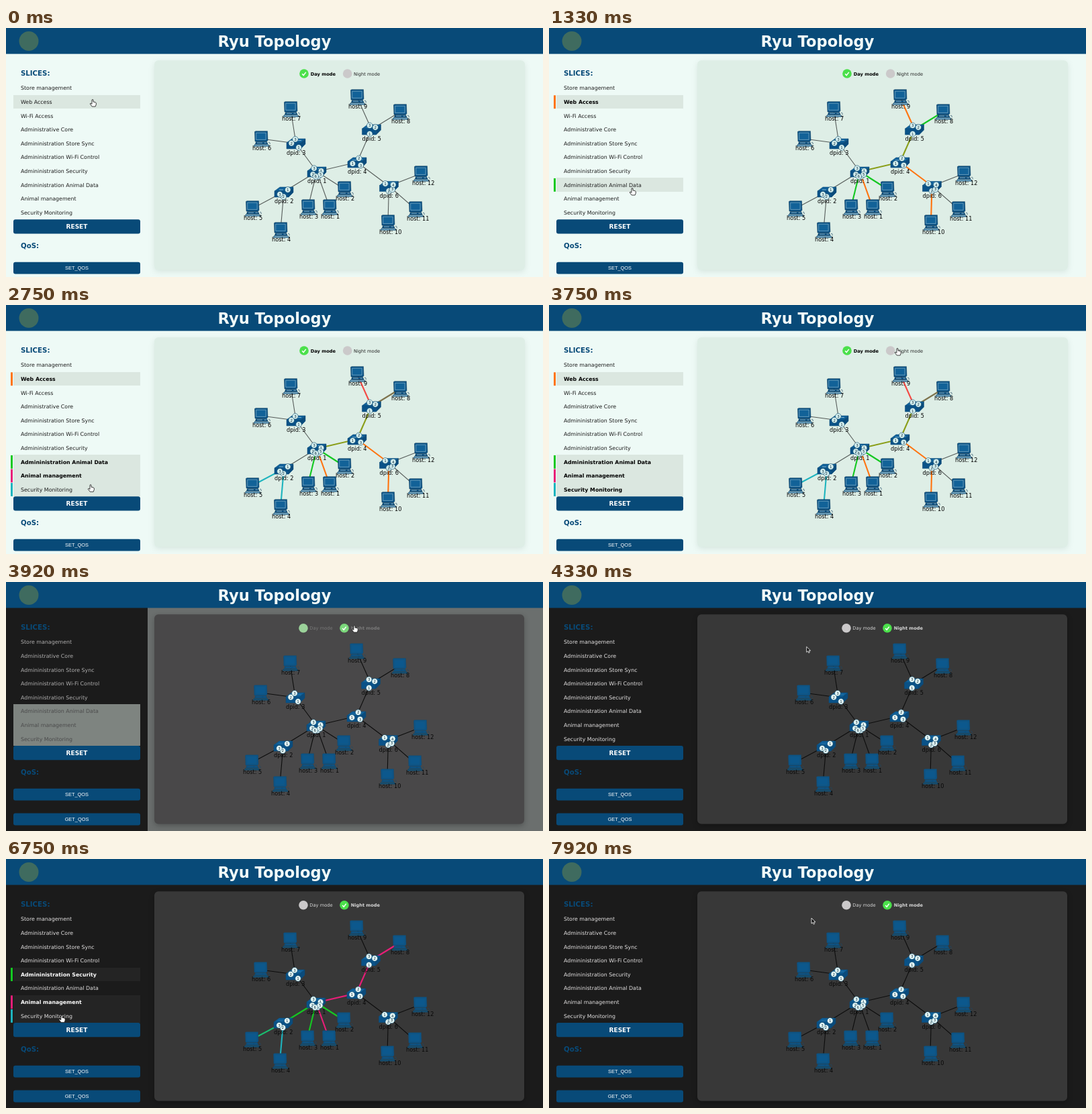
Write an HTML page that moves like this. It is 800 px wide and 371 px high and loops after 8000 ms.

```html
<!DOCTYPE html>
<html lang="en">
<head>
<meta charset="utf-8">
<title>Ryu Topology</title>
<style>
html, body { margin: 0; width: 100%; height: 100%; overflow: hidden; background: #eefaf6; }
svg { display: block; width: 800px; height: 371px; }
text { font-family: "DejaVu Sans", Verdana, sans-serif; white-space: pre; }
.b { font-weight: bold; }
.btn { font-family: "Liberation Sans", Arial, sans-serif; }
.mid { text-anchor: middle; }
</style>
</head>
<body>
<svg id="stage" viewBox="0 0 800 371"></svg>
<script>
const LOOP = 8000, STEP = 1000 / 12, NIGHT_AT = 3830, RESET_AT = 7560, DWELL = 170;
const BLUE = '#084a78';
const ROW_TOP = 79.2, ROW_H = 20.6;
const COLORS = { orange: [255, 116, 16], green: [20, 200, 34], pink: [232, 30, 120], cyan: [30, 180, 190] };

const nodes = {
  1: [463, 214], 2: [414, 244], 3: [432, 172], 4: [523, 200], 5: [544.5, 151], 6: [570.5, 235.5],
  h1: [482, 267], h2: [504, 240], h3: [450, 267], h4: [409, 301], h5: [367, 269], h6: [380, 165],
  h7: [424, 121], h8: [587, 125], h9: [523, 103], h10: [569, 290], h11: [610, 270], h12: [618, 217]
};

// For each switch: neighbours listed by port number
const ports = {
  1: '4 2 3 h1 h2 h3', 2: '1 h4 h5', 3: '1 h6 h7', 4: '1 5 6', 5: '4 h8 h9', 6: '4 h10 h11 h12'
};

const links = [];
for (const s in ports) for (const n of ports[s].split(' ')) {
  if (n[0] === 'h' || +n > +s) links.push(s + '-' + n);
}

const slices = {
  'Store management': {},
  'Web Access': { color: 'orange', day: '1-h1 1-4 4-5 5-h9 4-6 6-h10' },
  'Wi-Fi Access': {},
  'Administrative Core': {},
  'Admininistration Store Sync': {},
  'Admininistration Wi-Fi Control': {},
  'Admininistration Security': { color: 'green', night: '1-2 2-h5 1-h2 1-h3' },
  'Admininistration Animal Data': { color: 'green', day: '1-h2 1-h3 1-4 4-5 5-h8' },
  'Animal management': { color: 'pink', day: '5-h8 5-h9', night: '1-h1 1-4 4-5 5-h8' },
  'Security Monitoring': { color: 'cyan', day: '2-h4 2-h5', night: '2-h4 2-h5' }
};
const dayList = Object.keys(slices);
const nightList = dayList.filter(name => !/^W/.test(name));

// time, slice chosen
const clicks = [
  [420, 'Web Access'], [1650, 'Admininistration Animal Data'], [2250, 'Animal management'],
  [3000, 'Security Monitoring'], [4980, 'Admininistration Security'],
  [6000, 'Animal management'], [6850, 'Security Monitoring']
];

// time, x, y of the pointer tip
const pointer = [
  [-100, 150, 60], [0, 129, 107], [750, 129, 108], [1150, 124, 236], [1330, 124, 239], [1750, 124, 239],
  [2000, 125, 252], [2350, 125, 252], [2560, 126, 268], [3150, 126, 269], [3600, 515, 66],
  [3750, 519, 65], [4150, 519, 65], [4650, 75, 168], [5050, 72, 170], [5280, 70, 206],
  [6150, 70, 208], [6400, 80, 232], [6950, 84, 234], [7250, 100, 254], [7600, 101, 254], [7900, 391, 88]
];

const clamp = v => Math.max(0, Math.min(1, v));
const rgb = c => `rgb(${c.map(Math.round)})`;
const blend = (a, b, k) => rgb(a.map((v, i) => v + (b[i] - v) * k));
const rect = (x, y, w, h, fill, extra = '') =>
  `<rect x="${x}" y="${y}" width="${w}" height="${h}" fill="${fill}" ${extra}/>`;
const text = (x, y, size, fill, str, cls = '') =>
  `<text x="${x}" y="${y}" font-size="${size}" fill="${fill}" class="${cls}">${str}</text>`;
const path = (d, fill, stroke = 'none', width = 0.5) =>
  `<path d="${d}" fill="${fill}" stroke="${stroke}" stroke-width="${width}"/>`;
const line = (a, b, color, width) =>
  `<path d="M${a}L${b}" stroke="${color}" stroke-width="${width}"/>`;

function pointerAt(t) {
  const i = pointer.findIndex(p => p[0] > t);
  if (i === 0) return pointer[0].slice(1);
  if (i < 0) return pointer[pointer.length - 1].slice(1);
  const [t0, x0, y0] = pointer[i - 1], [t1, x1, y1] = pointer[i];
  const u = (t - t0) / (t1 - t0), k = u * u * (3 - 2 * u);
  return [x0 + (x1 - x0) * k, y0 + (y1 - y0) * k];
}

function rowAt(t, list) {
  const [x, y] = pointerAt(t);
  return x > 11 && x < 200 ? list[Math.floor((y - ROW_TOP) / ROW_H)] : undefined;
}

function button(y, h, label, bold) {
  return rect(11, y, 189, h, BLUE, 'rx="3"') + (bold
    ? text(105.5, y + 14, 9, '#fff', label, 'b mid')
    : text(105.5, y + 11.5, 7.4, '#fff', label, 'btn mid'));
}

function sidebar({ night, k, list, chosen, hover, active }) {
  const row = (i, fill) => rect(11, ROW_TOP + i * ROW_H, 189, ROW_H, fill, 'shape-rendering="crispEdges"');
  let out = text(22, 71.2, 10.2, BLUE, 'SLICES:', 'b');
  list.forEach((name, i) => {
    const top = ROW_TOP + i * ROW_H;
    const picked = chosen.includes(name), color = slices[name].color;
    const leaving = night && k < 1 && i > 4;
    if (leaving) out += row(i, blend([219, 231, 224], [27, 27, 27], k * .78));
    else if (picked || name === hover) out += row(i, night ? '#242424' : '#dbe7e0');
    if (active.includes(name) && color) out += rect(7, top + .5, 3, ROW_H - .7, rgb(COLORS[color]));
    const ink = leaving ? blend([40, 40, 40], [225, 225, 225], k * .3)
      : night ? blend([90, 90, 90], [228, 226, 226], k) : '#1c1c1c';
    out += picked ? text(22, top + 13.1, 7.8, night ? '#fff' : '#000', name, 'b')
      : text(22, top + 13.1, 7.88, ink, name);
  });
  out += button(ROW_TOP + list.length * ROW_H, 21.3, 'RESET', true);
  out += text(22, night ? 286.8 : 328, 10.2, BLUE, 'QoS:', 'b');
  out += button(night ? 307.8 : 348.8, 17.8, 'SET_QOS');
  if (night) out += button(344.6, 17.8, 'GET_QOS');
  return out;
}

function toggle(x, y, on, fill) {
  return `<circle cx="${x}" cy="${y}" r="6.8" fill="${fill}"/>` +
    (on ? path(`M${x - 2.8} ${y + .2}l2 2.3 3.6-4.6`, 'none', '#fff', 1.5) : '');
}

function modes({ night, k }) {
  const on = [75, 224, 75], off = [203, 201, 202];
  if (!night) return toggle(444, 68, true, rgb(on)) + toggle(508.7, 68, false, rgb(off)) +
    text(453.7, 70.6, 6.7, '#000', 'Day mode', 'b') + text(518, 70.6, 6.7, '#222', 'Night mode');
  const ink = blend([30, 30, 30], [215, 215, 215], k ** 1.5);
  return toggle(443, 68.7, false, blend(on, off, k)) + toggle(504, 68.7, true, blend(off, on, k)) +
    text(452.3, 71.2, 6.7, ink, 'Day mode') + text(513.7, 71.2, 6.6, ink, 'Night mode', 'b');
}

function host([x, y], night) {
  const light = night ? '#1c587f' : '#b9d8e4', dark = night ? '#1b4a6b' : '#0b3553';
  return `<g transform="translate(${x} ${y})">` +
    path('M-9.5-10.5L-8-11.3H9.5L10 2.5 8.5 4H-9z', '#0b5488', dark) +
    path('M-7.3-8.8H7.2V1.4H-7.3z', night ? '#0c588d' : '#126298', light) +
    path('M-7.5 4.4H8.5L10 8H-8.5z', '#0b4f80', dark) +
    path('M-6 6.2H2M4.5 6.2H8', 'none', light, .7) +
    path('M-9.5 8.4H10.5L13 11.2H-11z', night ? '#104868' : '#3b7da5', dark) +
    path('M-9 9.7H11', 'none', light, .6) + path('M11 5.5q3-1 2 3', 'none', dark, .6) + '</g>';
}

function router([x, y], night) {
  return `<g transform="translate(${x} ${y})">` +
    path('M-14-1L-6-7H14L7-1z', '#0f609a', '#0b4a77') +
    path('M-14-1H7V8H-14z', '#0a5288', '#0b4a77') +
    path('M7-1L14-7V1L7 8z', '#0a4b7c', '#0b4a77') +
    path('M-7-3H-1M2-4.5H8', 'none', night ? '#2c75a5' : '#b5d7e6', .7) + '</g>';
}

function topology({ night, active }) {
  const mode = night ? 'night' : 'day';
  let out = '';
  for (const link of links) {
    const [a, b] = link.split('-').map(n => nodes[n]);
    const tints = active.filter(n => (slices[n][mode] || '').split(' ').includes(link))
      .map(n => COLORS[slices[n].color]);
    const mean = [0, 1, 2].map(c => tints.reduce((sum, t) => sum + t[c], 0) / tints.length);
    out += tints.length ? line(a, b, rgb(mean), 2.1)
      : line(a, b, night ? '#0c0c0c' : '#555b59', 1.1);
  }
  const ink = night ? '#080808' : '#000';
  for (const n in nodes) {
    const [x, y] = nodes[n], isHost = n[0] === 'h';
    out += isHost ? host([x, y], night) : router([x, y], night);
    out += isHost ? text(x - 13, y + 17.3, 8.2, ink, 'host: ' + n.slice(1))
      : text(x - 14, y + 17.3, 8.2, ink, 'dpid: ' + n);
  }
  for (const s in ports) ports[s].split(' ').forEach((n, i) => {
    const [x, y] = nodes[s], [tx, ty] = nodes[n];
    const d = 6.8 / Math.hypot(tx - x, ty - y);
    const px = x + (tx - x) * d, py = y + .5 + (ty - y) * d;
    out += `<circle cx="${px}" cy="${py}" r="4.3" fill="${night ? '#e6fafa' : '#d5f0f1'}" stroke="#164e6c" stroke-width=".6"/>` +
      text(px, py + 2, 5.6, '#102a38', i + 1, 'mid');
  });
  return `<g transform="translate(${night ? -1 : 0} 0)">${out}</g>`;
}

function cursor([x, y], hand) {
  const shape = hand
    ? 'M-1 0Q0-1 1 0V3L4 3.6 5.3 4.6V7L4.2 10H-.8L-3.8 6 -3 5 -1 6.3z'
    : 'M0 0V8.2L1.9 6.5 3.2 9.3 4.6 8.6 3.4 5.9H6z';
  return `<g transform="translate(${x} ${y})">` +
    path(shape, hand ? '#fff' : '#111', hand ? '#111' : '#fff', .8) + '</g>';
}

function draw(t) {
  const night = t >= NIGHT_AT;
  const k = night ? 1 - (1 - clamp((t - NIGHT_AT) / 260)) ** 2.4 : 0;
  const list = night ? nightList : dayList;
  const since = night ? NIGHT_AT : 0;
  const chosen = clicks.filter(c => c[0] <= t && c[0] >= since && t < RESET_AT).map(c => c[1]);
  const hover = rowAt(t, list);
  const active = chosen.slice();
  if (hover && hover === rowAt(t - DWELL, list) && !active.includes(hover)) active.push(hover);
  const scene = { night, k, list, chosen, hover, active };

  const tip = pointerAt(t), [x, y] = tip;
  const onReset = x > 11 && x < 200 && y > 243 && y < 265;
  const onMode = x > 497 && x < 558 && y > 60 && y < 77;
  const card = night ? blend([100, 98, 100], [56, 56, 56], k) : '#deeee6';
  const cardWidth = night ? 551 : 552;

  document.getElementById('stage').innerHTML =
    '<defs><filter id="soft" x="-5%" y="-5%" width="110%" height="112%"><feGaussianBlur stdDeviation="4"/></filter></defs>' +
    rect(0, 0, 800, 371, blend([238, 250, 246], [27, 27, 27], k)) +
    (night ? rect(0, 0, 211, 371, '#1b1b1b') : '') +
    rect(0, 0, 800, 38.6, BLUE) +
    '<circle cx="34" cy="19.5" r="14.5" fill="#3f6b5f"/>' +
    text(400, 28.3, 22.6, '#f1faf8', 'Ryu Topology', 'b mid') +
    rect(221, 51, cardWidth, 312, night ? '#000' : '#8fa79b', 'rx="6" opacity=".25" filter="url(#soft)"') +
    rect(221, 48.2, cardWidth, 312.3, card, 'rx="6"') +
    sidebar(scene) + modes(scene) + topology(scene) +
    cursor(tip, hover || onReset || onMode);
}

let shown = -1;
const begin = performance.now();
function tick() {
  const step = Math.floor(((performance.now() - begin) % LOOP + 5) / STEP) % 96;
  if (step !== shown) draw((shown = step) * STEP);
  requestAnimationFrame(tick);
}
tick();
</script>
</body>
</html>
```
